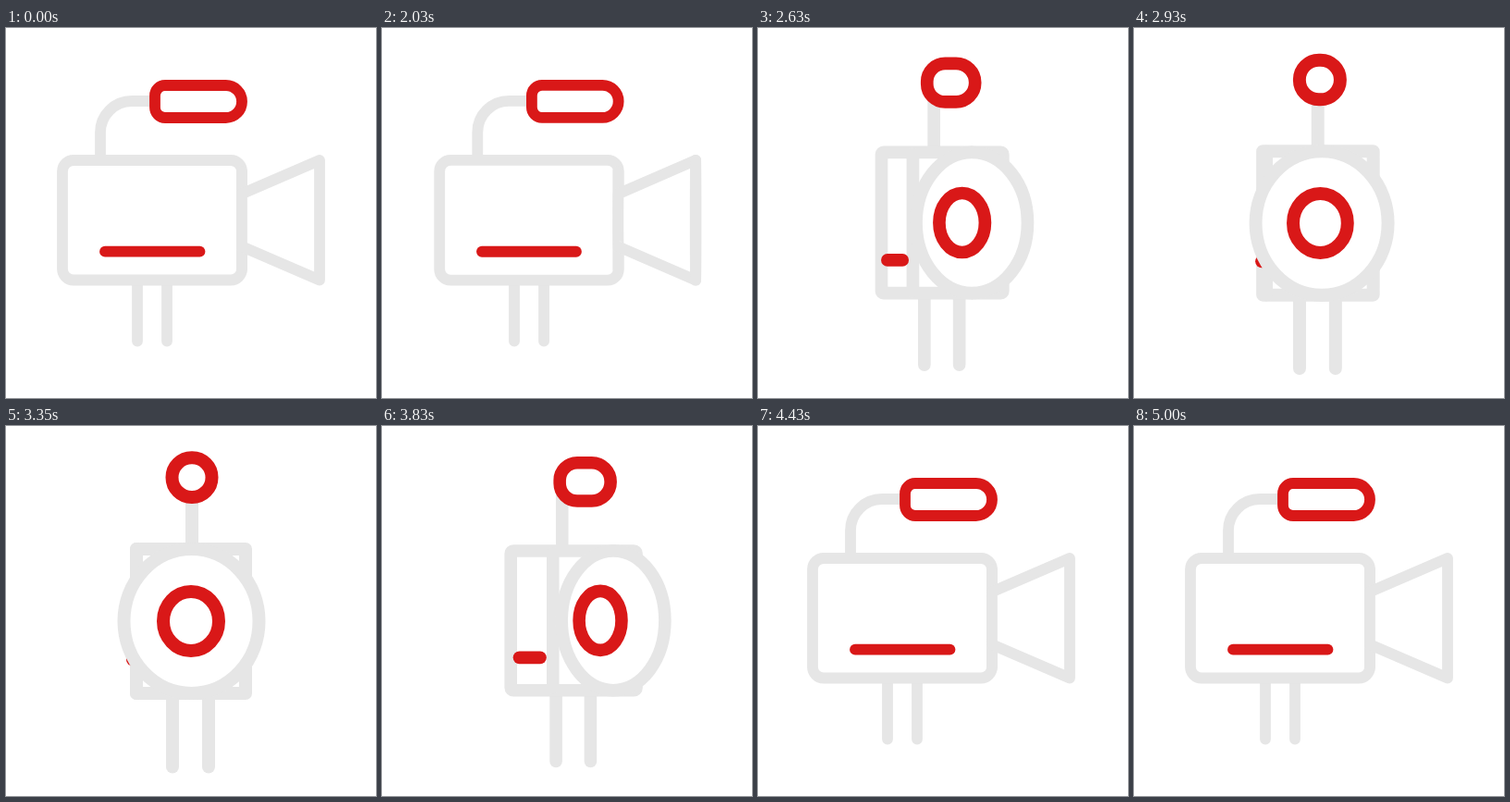
Animation of 400x400 px, one loop 5030 ms. Source, as an HTML page with a canvas:

```html
<!DOCTYPE html>
<html lang="en">
<head>
<meta charset="utf-8">
<title>Camera turn</title>
<style>
  html, body { margin: 0; height: 100%; overflow: hidden; background: #fff; }
  canvas { display: block; width: 400px; height: 400px; }
</style>
</head>
<body>
<canvas id="stage" width="400" height="400"></canvas>
<script>
const ctx = document.getElementById('stage').getContext('2d');
const GRAY = '#e6e6e6', RED = '#d91818';
const LOOP = 5030, START = 2030, STEP = 30;

// time, turn (1 = side view, 0 = front view), sideways drift
const KEYS = [
  [2000, 1, 0], [2030, .995, .8], [2150, .95, 9], [2230, .85, 18],
  [2350, .61, 22], [2450, .425, 17], [2540, .275, 11.5], [2630, .175, 6.5],
  [2800, .055, 1], [3080, 0, -1], [3200, 0, -2.3], [3350, 0, 0],
  [3500, .02, 3.5], [3620, .07, 7.8], [3830, .235, 17], [4000, .52, 17],
  [4160, .8, 10], [4250, .93, 6], [4430, 1, -2], [4580, 1, -4],
  [4730, 1, -3], [4900, 1, -.6], [5000, 1, 0]
];

const mix = (a, b, k) => a + (b - a) * k;

// Smooth curve through the keys of one column
function sample(t, col) {
  const last = KEYS.length - 1;
  if (t <= KEYS[0][0]) return KEYS[0][col];
  if (t >= KEYS[last][0]) return KEYS[last][col];
  const i = KEYS.findIndex(k => k[0] > t) - 1;
  const slope = j => {
    const a = KEYS[Math.max(j - 1, 0)], b = KEYS[Math.min(j + 1, last)];
    return (b[col] - a[col]) / (b[0] - a[0]);
  };
  const [a, b] = [KEYS[i], KEYS[i + 1]];
  const d = b[0] - a[0], u = (t - a[0]) / d, v = 1 - u;
  return v * v * (1 + 2 * u) * a[col] + u * u * (3 - 2 * u) * b[col]
    + d * u * v * (v * slope(i) - u * slope(i + 1));
}

function stroke(color, path, fill) {
  ctx.beginPath();
  path();
  if (fill) ctx.fill();
  ctx.strokeStyle = color;
  ctx.stroke();
}

function line(color, x1, y1, x2, y2) {
  stroke(color, () => { ctx.moveTo(x1, y1); ctx.lineTo(x2, y2); });
}

function draw(time) {
  const turn = Math.min(1, Math.max(0, sample(time, 1)));
  const drift = sample(time, 2);
  const zoom = turn - .2 * turn * (1 - turn);
  // Each helper takes the side-view value, then the front-view value
  const X = (side, front) => mix(front, side, turn) + drift;
  const Y = (side, front) => mix(front, side, zoom);
  const W = (side, front) => mix(front, side, turn);

  ctx.fillStyle = '#fff';
  ctx.fillRect(0, 0, 400, 400);
  ctx.lineCap = ctx.lineJoin = 'round';
  ctx.lineWidth = Y(11.8, 14);

  const top = Y(143, 133), bottom = Y(272.5, 289), mid = (top + bottom) / 2;

  // Microphone arm
  const armX = X(102, 201), armY = Y(79, 56), bend = 34 * turn;
  stroke(GRAY, () => {
    ctx.moveTo(armX, top);
    ctx.lineTo(armX, armY + bend);
    ctx.arcTo(armX, armY, armX + bend, armY, bend);
    ctx.lineTo(X(158, 201), armY);
  });

  // Microphone
  const micTop = Y(62, 34.3), rl = W(11, 21.3), rr = W(17.3, 21.3);
  stroke(RED, () => ctx.roundRect(X(161, 179.5), micTop, W(94, 43),
    Y(97, 77) - micTop, [rl, rr, rr, rl]), true);

  // Legs
  for (const [side, front] of [[142, 180], [174, 219]]) {
    line(GRAY, X(side, front), bottom, X(side, front), Y(338.5, 368.5));
  }

  // Body with its near edge
  const left = X(61, 141), right = X(255, 259), edge = X(255, 141);
  const corner = 12 * turn;
  stroke(GRAY, () => ctx.roundRect(left, top, right - left, bottom - top, corner), true);
  line(GRAY, edge, top + corner, edge, bottom - corner);

  const barY = Y(241.7, 252.5);
  line(RED, X(107, 139), barY, X(209.5, 137), barY);

  // Lens cone
  const lensX = X(339, 200.5), lensRx = W(0, 73), lensRy = (bottom - top) / 2;
  stroke(GRAY, () => {
    ctx.ellipse(X(255, 200), mid, W(0, 34), Y(28.5, 34), 0, Math.PI / 2, Math.PI * 1.5);
    ctx.lineTo(lensX, top);
    ctx.lineTo(lensX, bottom);
    ctx.closePath();
  }, true);

  // Lens opening, with the inner ring seen only through it
  if (lensRx < .3) return;
  const rim = () => ctx.ellipse(lensX, mid, lensRx, lensRy, 0, 0, Math.PI * 2);
  ctx.save();
  ctx.beginPath();
  rim();
  ctx.fill();
  ctx.clip();
  stroke(RED, () => ctx.ellipse(X(281, 200), mid, W(0, 30), 32, 0, 0, Math.PI * 2));
  ctx.restore();
  stroke(GRAY, rim);
}

const origin = performance.now();
function frame() {
  const t = (performance.now() - origin) % LOOP;
  draw(t < START ? 0 : START + STEP * Math.floor((t - START) / STEP));
  requestAnimationFrame(frame);
}
frame();
</script>
</body>
</html>
```
